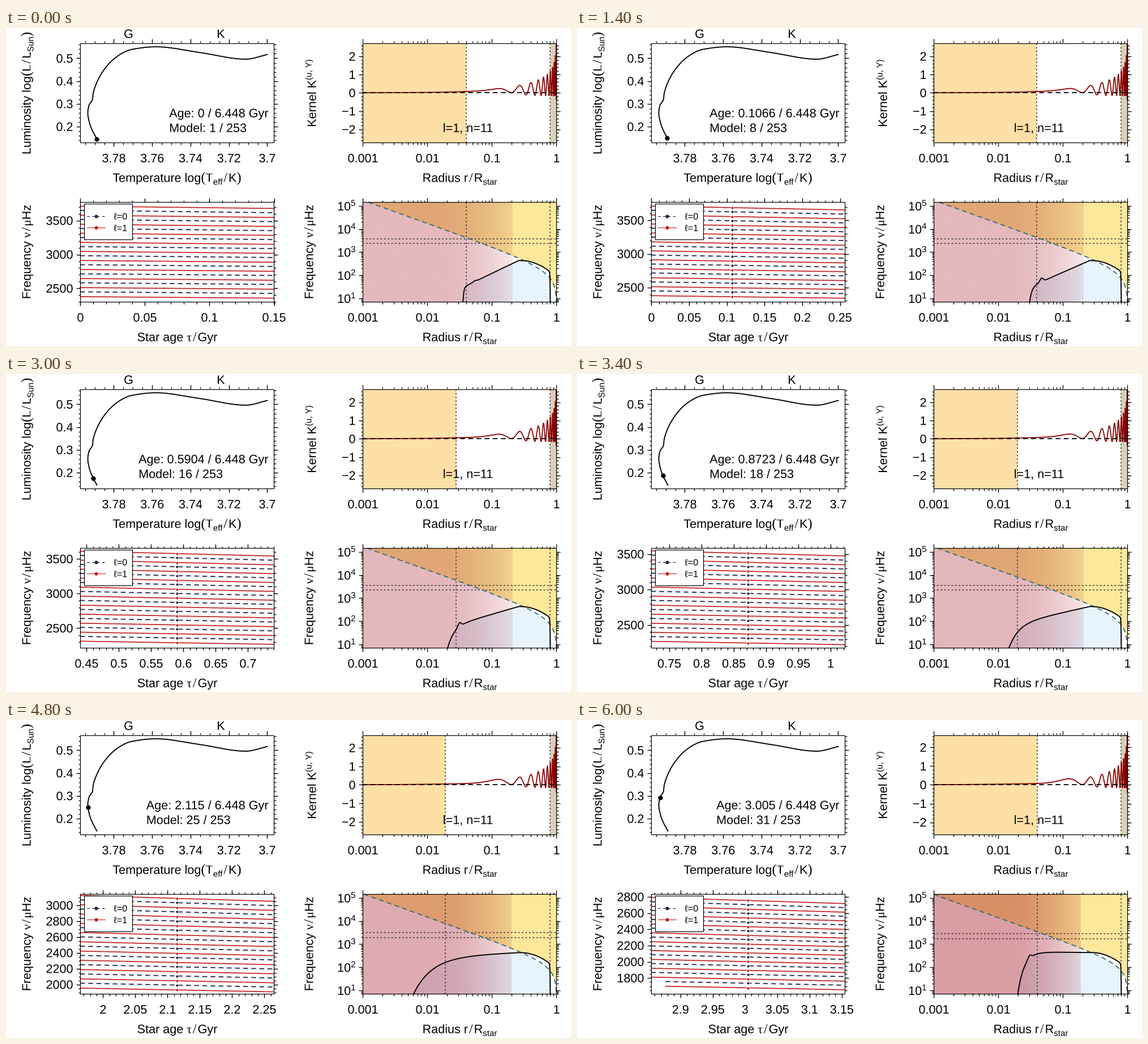
These frames come from a looping animation (998x561 px, 6200 ms). A matplotlib script:

```python
import numpy as np
import matplotlib.pyplot as plt
from matplotlib.animation import FuncAnimation
from matplotlib.patches import PathPatch, Rectangle
from matplotlib.textpath import TextPath
from matplotlib.transforms import Affine2D

W, H, PT = 998, 561, 0.72
SANS, SERIF = "Liberation Sans", "Liberation Serif"
SIZE = 21.6
DASH, DOT = (0, (4, 4)), (0, (1, 3))
NAVY, RED, WINE, TEAL, GREY = "#25254a", "#c81e1e", "#8b0000", "#2f6f78", "#333333"
HR, KERNEL = (131, 26, 473, 202), (630, 26, 972, 202)
ECHELLE, PROP = (131, 307, 473, 483), (630, 307, 972, 483)

fig = plt.figure(figsize=(W / 100, H / 100), dpi=100, facecolor="white")
ax = fig.add_axes([0, 0, 1, 1])
# whole numbers are pixel centres
ax.set(xlim=(-0.5, W - 0.5), ylim=(H - 0.5, -0.5))
ax.axis("off")
ax.set_autoscale_on(False)
live = []


# ---------- helpers ----------

def pchip(x, xs, ys):
    """Monotone cubic interpolation."""
    x, xs, ys = (np.asarray(v, float) for v in (x, xs, ys))
    h = np.diff(xs)
    d = np.diff(ys) / h
    m = np.r_[d[0], np.zeros(len(xs) - 2), d[-1]]
    p, s = d[:-1] * d[1:], d[:-1] + d[1:]
    m[1:-1] = np.where(p > 0, 2 * p / np.where(s == 0, 1, s), 0)
    i = np.clip(np.searchsorted(xs, x, "right") - 1, 0, len(xs) - 2)
    t = (x - xs[i]) / h[i]
    return (ys[i] * (1 + 2 * t) * (1 - t) ** 2 + ys[i + 1] * t * t * (3 - 2 * t)
            + h[i] * t * (1 - t) * (m[i] * (1 - t) - m[i + 1] * t))


def steps(lo, hi, step):
    return np.arange(np.ceil(lo / step - 1e-6), np.floor(hi / step + 1e-6) + 1) * step


def line(xs, ys, color="black", lw=1.9, style="-", z=3):
    live.extend(ax.plot(xs, ys, color=color, lw=lw * PT, ls=style, zorder=z,
                        dash_capstyle="round", solid_joinstyle="round"))


def dots(xs, ys, r, color, z=4):
    live.extend(ax.plot(xs, ys, "o", color=color, ms=2 * r * PT, mew=0, zorder=z))


def rect(x0, y0, x1, y1, color, z=1, edge="none"):
    live.append(ax.add_patch(Rectangle((x0, y0), x1 - x0, y1 - y0, fc=color,
                                       ec=edge, lw=1.2 * PT, zorder=z)))


widths = {}


def advance(s, size, family):
    key = s, size, family
    if key not in widths:
        end = [TextPath((0, 0), t, size=size, prop={"family": family}).get_extents().x1
               for t in (s + "|", "|")]
        widths[key] = end[0] - end[1]
    return widths[key]


def label(x, y, *parts, ha=0.5, rot=0, size=SIZE):
    """Parts: strings, gaps in px, or (text, scale, rise, family)."""
    run, paths = 0, []
    for p in parts:
        if isinstance(p, (int, float)):
            run += p
            continue
        s, k, rise, fam = (p, 1, 0, SANS) if isinstance(p, str) else p
        paths.append(TextPath((run, rise), s, size=size * k, prop={"family": fam}))
        run += advance(s, size * k, fam)
    tr = Affine2D().translate(-ha * run, 0).scale(1, -1).rotate_deg(rot).translate(x, y)
    for p in paths:
        live.append(ax.add_patch(PathPatch(tr.transform_path(p), fc="black", lw=0, zorder=6)))
    return run


def sub(s):
    return s, 0.7, -5, SANS


def sup(s):
    return s, 0.7, 8, SANS


def sym(s, k=1):
    return s, k, 0, SERIF


SLASH = (2, sym("/", 1.1), 2)
OPEN, CLOSE = sym("(", 1.15), sym(")", 1.15)


def x_ticks(box, major, minor):
    x0, y0, x1, y1 = box
    for xs, n in ((major, 7), (minor, 3.5)):
        xs = [x for x in xs if x0 - 0.5 <= x <= x1 + 0.5]
        for a, b in ((y1, y1 + n), (y0 - n, y0)):
            live.append(ax.vlines(xs, a, b, colors="black", lw=1.3 * PT, zorder=5))


def y_ticks(box, major, minor):
    x0, y0, x1, y1 = box
    for ys, n in ((major, 7), (minor, 3.5)):
        ys = [y for y in ys if y0 - 0.5 <= y <= y1 + 0.5]
        for a, b in ((x0 - n, x0), (x1, x1 + n)):
            live.append(ax.hlines(ys, a, b, colors="black", lw=1.3 * PT, zorder=5))


def num(v):
    return f"{round(float(v), 4) + 0:g}".replace("-", "\u2212")


# ---------- stellar model, all driven by age in Gyr ----------

BIRTH = (0, 0.95, 2.877)  # ages at which a lower mode enters the set


def star_age(i):
    return float(pchip(i, [0, 7, 11, 15, 20, 24, 30],
                       [0, 0.1066, 0.264, 0.5904, 1.401, 2.115, 3.005]))


def core_edge(age):
    """The convective core shrinks, then grows back."""
    return max(813 - 45 * age ** 1.7, 812.5 - 37 * ((3.005 - age) / 0.89) ** 1.3)


def modes(t, shift):
    """Lowest l=1 frequency and the large separation."""
    top, low = 3713 - 226 * t - 7 * t * t, 2378 - 146 * t - 5 * t * t
    gap = (top - low) / 10
    return low - shift * gap, gap


def radius(x):
    return 10 ** ((x - 972) / 114)


def kernel(r, age):
    """Oscillation between two envelopes, evenly spaced in acoustic depth."""
    phase = 12.2 * (1 - np.sqrt(1 - r)) - 0.75
    upper = 0.9 * r ** 0.65 * (1.003 - r) ** -0.27
    upper = upper * (1 + 0.25 * age * np.exp(-(r / 0.15) ** 2))
    lower = (2.2 * r * np.exp(-(r / 0.16) ** 2) - 0.16 * r ** 2 / (r ** 2 + 0.04)
             - 2.6 * r ** 400)
    mix = (1 + np.cos(2 * np.pi * phase)) / 2
    return np.clip(lower + (upper - lower) * mix, -2.68, 2.68)


def lamb_curve(x, age):
    r = radius(x)
    y = 307 + 0.358 * (x - 640 + 3.8 * age * (1 - r)) - 28.6 * np.log10(1.0005 - r)
    return np.clip(y, 307, 483)


def buoyancy_start(age):
    early = 813 - 45 * age ** 1.7 - 15 * np.tanh(0.45 + 8 * age)
    return max(719, early, 778 - 66 * (3.005 - age))


def buoyancy_curve(x, age):
    s = buoyancy_start(age)
    slope = 0.56 * np.exp(-0.7 * age) - 0.08

    def base(v):
        return 409.7 + slope * np.maximum(905 - v, 0)

    rise = (483 - base(s)) * np.exp(-(x - s) / max(1.5, (810 - s) / 2.8))
    bump = 13 * np.exp(-((s - 789) / 12) ** 2) * np.exp(-((x - s - 21) / 4) ** 2)
    drop = 15 * (np.maximum(x - 908, 0) / 46) ** 2 + 56 * np.exp((x - 961) / 0.5)
    return np.clip(base(x) + rise - bump + drop, 307, 483)


def track_curve():
    pts = np.array([(160, 195.3), (153.3, 183), (147, 167), (144, 149), (146, 136),
                    (152.4, 125), (153, 118), (163, 89), (192, 52.5), (222, 37.2),
                    (264, 32.6), (340, 42.4), (423, 54.5), (461, 46.3)])
    u = np.r_[0, np.cumsum(np.hypot(*np.diff(pts, axis=0).T))]
    s = np.linspace(0, u[-1], 500)
    return pchip(s, u, pts[:, 0]), pchip(s, u, pts[:, 1])


TRACK = track_curve()


# ---------- panels ----------

def draw_static():
    for x0, y0, x1, y1 in (HR, KERNEL, ECHELLE, PROP):
        rect(x0, y0, x1, y1, "none", 5, "black")

    line(*TRACK)
    hx = lambda v: 461 + (3.7 - v) * 3387.5
    hy = lambda v: 53 + (0.5 - v) * 402
    tx, ty = steps(3.7, 3.79, 0.02), steps(0.2, 0.5, 0.1)
    x_ticks(HR, hx(tx), hx(steps(3.69, 3.8, 0.005)))
    y_ticks(HR, hy(ty), hy(steps(0.12, 0.58, 0.02)))
    for v in tx:
        label(hx(v), 236.5, num(v))
    for v in ty:
        label(118, hy(v) + 7.5, num(v), ha=1)
    label(216, 17, "G")
    label(379, 17, "K")
    label(301.5, 271, "Temperature log", OPEN, "T", sub("eff"), *SLASH, "K", CLOSE)
    label(43, 114.5, "Luminosity log", OPEN, "L", *SLASH, "L", sub("Sun"), CLOSE, rot=-90)

    # log axes on the right
    logs = np.log10(np.arange(2, 10))
    decades = 630 + 114 * np.arange(4)
    for box, base in ((KERNEL, 236.5), (PROP, 517.5)):
        x_ticks(box, decades, (decades[:, None] + 114 * logs).ravel())
        for x, s in zip(decades, ("0.001", "0.01", "0.1", "1")):
            label(x, base, s)
        label(801, base + 34.5, "Radius r", *SLASH, "R", sub("star"))
    ys = 476.5 - 40.8 * np.arange(-1, 5)
    y_ticks(PROP, ys, (ys[:, None] - 40.8 * logs).ravel())
    for n, y in enumerate(ys[1:], 1):
        label(617, y + 8, "10", sup(str(n)), ha=1)

    label(547, 114.5, "Kernel K", sup("(u, Y)"), rot=-90)
    label(815.5, 183, "l=1, n=11")
    label(302, 552, "Star age ", sym("\u03c4"), *SLASH, "Gyr")
    for x in (43, 542):
        label(x, 394.5, "Frequency ", sym("\u03bd"), *SLASH, sym("\u03bc"), "Hz", rot=-90)

    # legend
    rect(138, 310, 223, 373, "white", 5, "black")
    for y, c, style, s in ((331.5, NAVY, DASH, "0"), (352, RED, "-", "1")):
        line([143, 175], [y, y], c, 1.1, style, 6)
        dots([159], [y], 3.1, c, 7)
        label(190, y + 5.8, "\u2113=" + s, ha=0, size=16.2)


def draw_track(i, age):
    xs, ys = TRACK
    n = ys.argmin()
    y = 195.2 - 19.7 * age
    dots([np.interp(-y, -ys[:n], xs[:n])], [y], 4.1, "black")
    w = label(463, 157, f"Age: {age:.4g} / 6.448 Gyr", ha=1)
    label(463 - w, 183, f"Model: {i + 1} / 253", ha=0)


def draw_kernel(age, core):
    unit = 32.2 + 0.09 * age ** 2
    ky = lambda v: 114 - unit * v
    rect(630, 26, core, 202, "#fedfa6")
    rect(961, 26, 972, 202, "#d8d1b8")
    for x in (core, 961):
        line([x, x], [202, 26], GREY, 1.6, DOT, 2)
    x = np.r_[np.linspace(630, 930, 400), np.linspace(930.1, 971.9, 700)]
    line(x, ky(kernel(radius(x), age)), WINE, 1.8)
    line([630, 972], [114, 114], "black", 1.8, DASH)
    y_ticks(KERNEL, ky(np.arange(-2, 3)), ky(np.arange(-14, 15) * 0.2))
    for v in range(-2, 3):
        label(617, ky(v) + 7.5, num(v), ha=1)


def draw_modes(i, age, shift):
    t0, t1 = max(0, age - 0.15), age + 0.15
    low, gap = modes(age, shift)
    pad = 80 - 33 * np.exp(-((age - 1.8) / 0.8) ** 2)
    lo, hi = low - pad, min(low + 10 * gap + pad, 3770)
    px = lambda t: 131 + 342 * (t - t0) / (t1 - t0)
    py = lambda f: 483 - 176 * (f - lo) / (hi - lo)

    for k in range(11):
        t = np.linspace(max(t0, BIRTH[shift]) if k == 0 else t0, t1, 30)
        base, d = modes(t, shift)
        line(px(t), py(base + k * d), RED, 1.7)
        if k < 10:
            line(px(t), py(base + (k + 0.53) * d), NAVY, 1.8, DASH)
    if i:
        k = np.arange(11)
        for f, c in ((low + k * gap, RED), (low + (k[:-1] + 0.53) * gap, NAVY)):
            x = np.full(len(f), px(age))
            dots(x, py(f), 3, "white", 4)
            dots(x, py(f), 2.1, c, 4.5)

    tx = steps(t0, t1, 0.05)
    x_ticks(ECHELLE, px(tx), px(steps(t0, t1, 0.01)))
    for t in tx:
        label(px(t), 517.5, num(t))
    step, small = (500, 100) if hi - lo > 1400 else (200, 50)
    ty = steps(lo, hi, step)
    y_ticks(ECHELLE, py(ty), py(steps(lo, hi, small)))
    for f in ty:
        label(118, py(f) + 7.5, f"{f:.0f}", ha=1)


def draw_propagation(age, core, low, high):
    x = np.linspace(630, 972, 1369)
    lamb = lamb_curve(x, age)
    inside = (x >= buoyancy_start(age)) & (x <= 961)
    buoy = np.where(inside, buoyancy_curve(np.clip(x, 700, 961), age), 483)

    for y0, y1, c in ((307, np.minimum(lamb, buoy), "#fbe89b"),
                      (np.maximum(lamb, buoy), 483, "#e8f4fd")):
        live.append(ax.fill_between(x, y0, y1, color=c, lw=0, zorder=1))

    # red shade fading outward up to a hard edge
    edge = 895 - 0.6 * age ** 2
    fall = np.clip((np.linspace(630, edge, 260) - 770) / (edge - 770), 0, 1) ** 1.6
    shade = np.zeros((1, 260, 4))
    shade[..., :3] = np.array([158, 1, 19]) / 255
    shade[..., 3] = (0.28 + 0.0116 * age ** 2) * (1 - 0.65 * fall)
    live.append(ax.imshow(shade, extent=(630, edge, 483, 307), aspect="auto",
                          interpolation="bilinear", zorder=2))

    for v in (core, 961):
        line([v, v], [483, 307], GREY, 1.6, DOT)
    for f in (low, high):
        y = 394.7 - 40.8 * (np.log10(f) - 3)
        line([630, 972], [y, y], GREY, 1.6, DOT)
    seen = lamb > 307
    line(x[seen], lamb[seen], TEAL, 1.8, DASH)
    line(x[inside], buoy[inside])


def draw(i):
    for a in live:
        a.remove()
    live.clear()
    age = star_age(i)
    core = core_edge(age)
    shift = int(np.searchsorted(BIRTH, age + 0.03, "right")) - 1
    low, gap = modes(age, shift)
    draw_track(i, age)
    draw_kernel(age, core)
    draw_modes(i, age, shift)
    draw_propagation(age, core, low, low + 10 * gap)
    return []


draw_static()
live.clear()
anim = FuncAnimation(fig, draw, frames=31, interval=200, init_func=lambda: [],
                     repeat=True, repeat_delay=0, blit=False)
plt.show()
```
